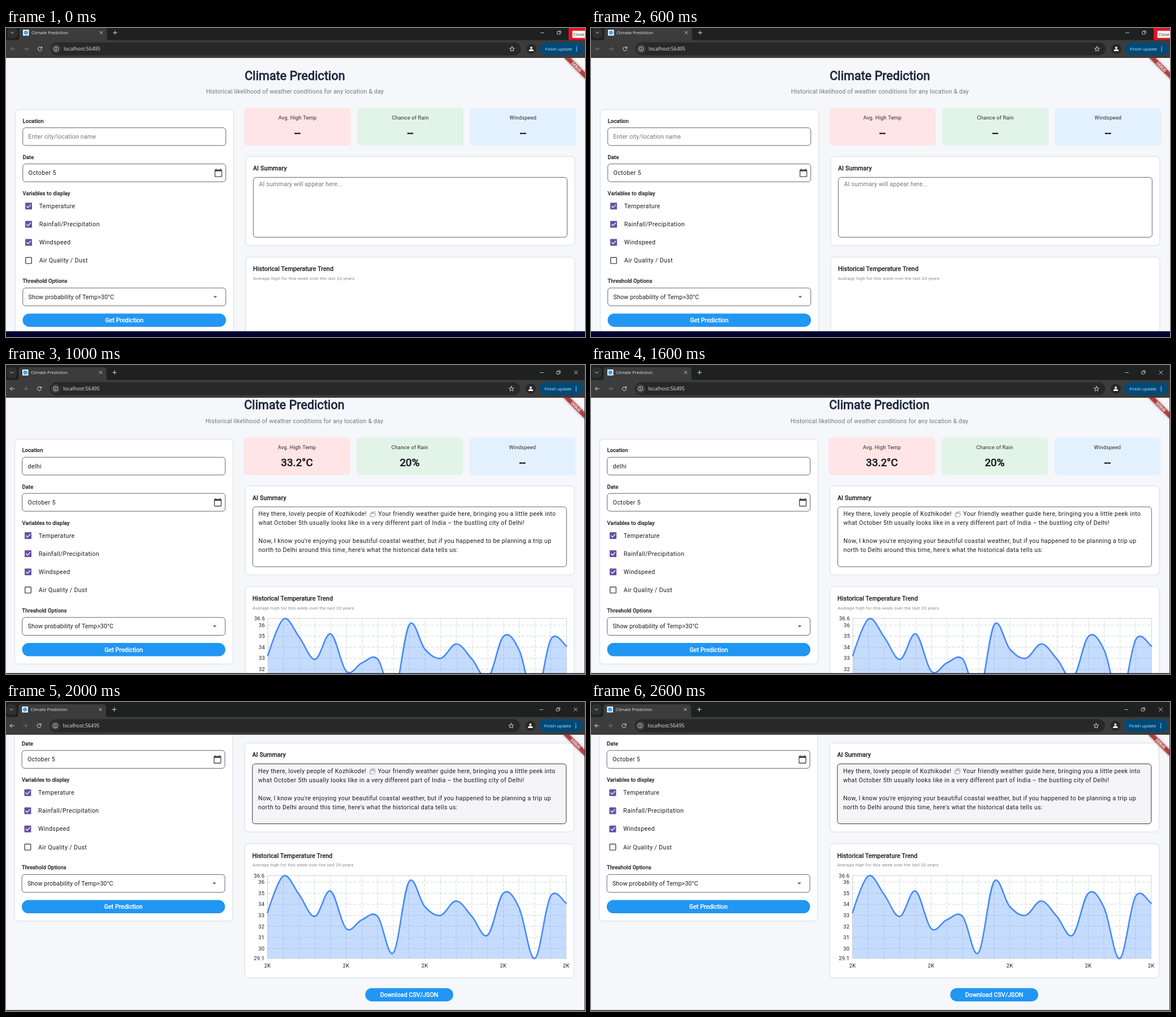
An HTML page for the animation above (3000 ms loop, 1024 px wide and 547 px high).

```html
<!DOCTYPE html>
<html lang="en">
<head>
<meta charset="utf-8">
<title>Climate Prediction</title>
<style>
  html, body { margin: 0; width: 100%; height: 100%; overflow: hidden; background: #f5f7fb; }
  svg { display: block; width: 1024px; height: 547px; }
  text { white-space: pre; font-family: Roboto, sans-serif; }
  .ui { font-family: "Open Sans", "Noto Sans", sans-serif; }
  .card { fill: #fff; filter: drop-shadow(0 .7px 1px rgba(0, 0, 0, .25)); }
  .line { fill: none; stroke-linecap: round; stroke-linejoin: round; }
</style>
</head>
<body>
<svg id="stage" viewBox="0 0 1024 547"></svg>
<script>
const INK = '#1d1b20', GREY = '#757575', BLUE = '#2196f3';
const SCALE = 2 / 3; // app units to stage pixels

const SCENES = [
  { dx: 0, chromeY: 0, scroll: 0, maximized: false, loaded: false, hover: false },
  { dx: -1, chromeY: 5, scroll: -13.3, maximized: true, loaded: true, hover: false },
  { dx: -1.6, chromeY: 5, scroll: -154.8, maximized: true, loaded: true, hover: true },
];

const SUMMARY = [
  [0, 'what October 5th usually looks like in a very different part of India – the bustling city of Delhi!'],
  [2, "Now, I know you're enjoying your beautiful coastal weather, but if you happened to be planning a trip up"],
  [3, "north to Delhi around this time, here's what the historical data tells us:"],
];

const TEMPS = [33.25, 36.55, 34.9, 32.9, 35.2, 31.8, 32.6, 32.9, 29.6, 36.05,
  33.8, 33, 34.3, 32.9, 31.2, 35, 33.7, 29.1, 34.7, 34.1];

const rect = (x, y, w, h, r, attrs) =>
  `<rect x="${x}" y="${y}" width="${w}" height="${h}" rx="${r}" ${attrs}/>`;
const circle = (x, y, r, attrs) => `<circle cx="${x}" cy="${y}" r="${r}" ${attrs}/>`;
const line = (d, color, width = 1, attrs = '') =>
  `<path class="line" d="${d}" stroke="${color}" stroke-width="${width}" ${attrs}/>`;
const group = (x, y, body) => `<g transform="translate(${x} ${y})">${body}</g>`;

// App text, vertically centred on y; bold is a thickened regular weight.
function text(x, y, str, { size = 16, gap = .25, color = INK, anchor = 'start', bold = false } = {}) {
  const px = size * SCALE;
  const stroke = bold ? `stroke="${color}" stroke-width="${px * .04}"` : '';
  return `<text x="${x}" y="${y + px * .355}" font-size="${px}" letter-spacing="${gap * SCALE}"
    fill="${color}" text-anchor="${anchor}" ${stroke}>${str.replace(/&/g, '&amp;').replace(/>/g, '&gt;')}</text>`;
}
const uiText = (x, y, str, px, color) =>
  `<text class="ui" x="${x}" y="${y + px * .36}" font-size="${px}" fill="${color}">${str}</text>`;

const label = (y, str) => text(29.5, y, str, { size: 14, bold: true });
const field = (x, y, w, h, fill = '#fff', stroke = '#55535a') =>
  rect(x, y, w, h, 5, `fill="${fill}" stroke="${stroke}" stroke-width=".9"`);
const button = (x, y, w, str) => rect(x, y, w, 23.5, 11.75, `fill="${BLUE}"`) +
  text(x + w / 2, y + 11.9, str, { gap: .1, color: '#fff', anchor: 'middle', bold: true });

function checkbox(y, str, checked) {
  const box = checked
    ? rect(34, y - 6, 12, 12, 1.2, 'fill="#6750a4"') + line(`M36.6 ${y + .2}l2.4 2.4 4.6-4.8`, '#fff', 1.3)
    : rect(34.7, y - 5.3, 10.6, 10.6, .8, 'fill="none" stroke="#49454f" stroke-width="1.4"');
  return box + text(58.7, y, str, { gap: .5 });
}

function form({ loaded }) {
  const calendar = 'M20 3h-1V1h-2v2H7V1H5v2H4c-1.1 0-2 .9-2 2v16c0 1.1.9 2 2 2h16c1.1 0 2-.9 2-2V5c0-1.1-.9-2-2-2zm0 18H4V8h16v13z';
  return rect(17, 145, 385, 397, 6, 'class="card"') +
    label(164.2, 'Location') + field(29.7, 176.6, 359, 31.4) +
    (loaded ? text(39.5, 192.3, 'delhi', { gap: .5 })
            : text(39.3, 192.3, 'Enter city/location name', { color: GREY })) +
    label(228.5, 'Date') + field(29.7, 240.6, 359, 31.6) + text(39.5, 256.3, 'October 5', { gap: .5 }) +
    `<path transform="translate(367.6 248.4) scale(${SCALE})" d="${calendar}" fill="#49454f"/>` +
    label(292.8, 'Variables to display') +
    ['Temperature', 'Rainfall/Precipitation', 'Windspeed', 'Air Quality / Dust']
      .map((name, i) => checkbox(315.3 + i * 32.1, name, i < 3)).join('') +
    label(447.9, 'Threshold Options') + field(29.7, 460.2, 359, 31.6) +
    text(39.5, 476, 'Show probability of Temp>30°C', { gap: .15 }) +
    '<path d="M366.7 474.4h6.7l-3.35 3.4z" fill="#616161"/>' +
    button(29.5, 505.4, 359.5, 'Get Prediction');
}

function stat(x, fill, name, value) {
  const style = { anchor: 'middle' };
  return rect(x, 141.7, 188.5, 66.5, 6, `fill="${fill}"`) +
    text(x + 94.2, 158.8, name, { ...style, size: 14, color: '#2b2a2e' }) +
    text(x + 94.2, 185.2, value, { ...style, size: 28, bold: true });
}

function summary({ loaded, hover }) {
  const top = 277, value = { gap: .5 };
  const wave = line('M3 10.5C1.4 8.6.6 7 1 6.4q.6-.7 1.5.4L1.8 4.2q.2-1 1.2-.4L4.6 6 3.8 2.4q.3-1 1.2-.2L6.7 5.6 6.5 2.5q.6-1 1.2 0L9 6.2q.4-1.6 1.2-1.3.8.4.2 2.2-.3 3.2-2.6 4-2.6.8-4.8-.6z', '#77757a', .7) +
    line('M7.8.6q2 .4 2.8 2.4M.4 9q.3 1.6 1.6 2.4', '#77757a', .6);
  return rect(424.5, 228, 581, 156.3, 6, 'class="card"') +
    text(437, 248.2, 'AI Summary', { bold: true }) +
    field(437.4, 264.4, 555, 106, hover ? '#f5f5f8' : '#fff', hover ? INK : undefined) +
    (loaded
      ? text(447.6, top, 'Hey there, lovely people of Kozhikode!', value) + group(644, 271, wave) +
        text(659.3, top, 'Your friendly weather guide here, bringing you a little peek into', value) +
        SUMMARY.map(([row, str]) => text(447.6, top + 16 * (row + 1), str, value)).join('')
      : text(447.5, 276.7, 'AI summary will appear here...', { color: GREY }));
}

function plot() {
  const left = 464.2, right = 992.3, top = 462, bottom = 608.8, max = 36.6, min = 29.1;
  const px = i => left + (right - left) * i / (TEMPS.length - 1);
  const py = v => bottom - (bottom - top) * (v - min) / (max - min);
  const pts = TEMPS.map((v, i) => [px(i), py(v)]);

  // Cubic segments whose tangents are a share of the neighbours' distance.
  let curve = `M${pts[0]}`, tangent = [0, 0];
  for (let i = 1; i < pts.length; i++) {
    const prev = pts[i - 1], next = pts[i + 1] || pts[i];
    const start = prev.map((p, k) => p + tangent[k]);
    tangent = prev.map((p, k) => (next[k] - p) / 2 * .35);
    curve += `C${start} ${pts[i].map((p, k) => p - tangent[k])} ${pts[i]}`;
  }

  const ticks = [36, 35, 34, 33, 32, 31, 30];
  const grid = ticks.map(v => `M${left} ${py(v)}H${right}`).join('') +
    TEMPS.slice(2).map((_, i) => `M${px(i + 1)} ${bottom}V${top}`).join('');
  return `<path d="${grid}" fill="none" stroke="#c3cbd0" stroke-width=".75" stroke-dasharray="5.33 2.67"/>` +
    `<path d="${curve}V${bottom}H${left}Z" fill="#448aff" fill-opacity=".3"/>` +
    rect(left, top, right - left, bottom - top, 0, 'fill="none" stroke="#bfc4c9" stroke-width=".8"') +
    line(curve, '#448aff', 2.6) +
    [max, ...ticks, min].map(v => text(458.8, py(v), String(v), { size: 14, anchor: 'end' })).join('') +
    [0, 5, 10, 15, 19].map(i => text(px(i), 621.4, '2K', { size: 14, anchor: 'middle' })).join('');
}

function page(scene) {
  const { loaded } = scene, centred = { anchor: 'middle' };
  return text(511, 84.2, 'Climate Prediction', { ...centred, size: 32, color: '#1b263b', bold: true }) +
    text(511, 112.5, 'Historical likelihood of weather conditions for any location & day', { ...centred, color: GREY }) +
    form(scene) +
    stat(421.3, '#ffe5e5', 'Avg. High Temp', loaded ? '33.2°C' : '--') +
    stat(620.8, '#e2f4e8', 'Chance of Rain', loaded ? '20%' : '--') +
    stat(820.2, '#e3f1ff', 'Windspeed', '--') +
    summary(scene) +
    rect(424.5, 406.3, 581, 236.3, 6, 'class="card"') +
    text(437, 426.7, 'Historical Temperature Trend', { bold: true }) +
    text(437, 443.2, 'Average high for this week over the last 20 years', { size: 12, color: '#8a8a8a' }) +
    (loaded ? plot() + button(637, 661.2, 155.5, 'Download CSV/JSON') : '');
}

const ribbon = `<g transform="translate(1025 53) rotate(45)">
  <rect x="-26.7" y="18.7" width="53.4" height="8" fill="#b71c1c" fill-opacity=".75"
    style="filter:drop-shadow(0 0 2px rgba(0,0,0,.5))"/>
  ${text(0, 22.7, 'DEBUG', { size: 10.2, gap: 0, color: '#fff', anchor: 'middle', bold: true })}</g>`;

function chrome({ maximized }) {
  const light = '#dedede', dim = '#7d7d7d';
  const arrow = (x, dir, color) => line(`M${x - 3.5} 37h7M${x + dir * .3} 33.7l${dir * 3.3} 3.3 ${-dir * 3.3} 3.3`, color);
  const cross = (x, y, r, color) => line(`M${x - r} ${y - r}l${2 * r} ${2 * r}m0 ${-2 * r}l${-2 * r} ${2 * r}`, color, .9);
  const star = Array.from({ length: 10 }, (_, i) => {
    const a = Math.PI * (i / 5 - .5), r = i % 2 ? 2 : 4.7;
    return [895 + r * Math.cos(a), 37.3 + r * Math.sin(a)];
  }).join('L');
  const close = maximized ? cross(1009, 8.2, 3, light)
    : rect(995, -6, 40, 27.3, 0, 'fill="#e81123"') +
      rect(1001.5, 4.8, 30, 13, 1, 'fill="#f9f9f9" stroke="#8a4a4a" stroke-width=".5"') +
      uiText(1003.3, 11.3, 'Close', 7.9, '#333');

  return rect(-5, -10, 1040, 32, 0, 'fill="#1f2020"') +
    rect(-5, 21.5, 1040, 31.5, 0, 'fill="#3c3c3c"') +
    rect(2.3, -1, 17.7, 19, 6, 'fill="#2f3030"') + line('M8.7 7.2l2.4 2.4 2.4-2.4', light) +
    '<path d="M19 22q4.5 0 4.5-5V4.500q0-5.500 5.500-5.500H173q5.500 0 5.500 5.500V17q0 5 4.500 5z" fill="#3c3c3c"/>' +
    rect(30, 3, 10.5, 10.5, .5, 'fill="#fff"') + circle(35.2, 8.2, 3.8, 'fill="#42a5f5"') +
    uiText(45, 8.2, 'Climate Prediction', 7.65, '#e6e6e6') +
    cross(168.5, 8.2, 2.3, light) + line('M189.700 8.200h6.600M193 4.900v6.600', light) +
    line('M945.500 8.500h6', light, .8) +
    line('M975.200 6.500h4.500v4.500h-4.500zM976.700 5h4.500v4.500', light, .8) + close +
    arrow(12, -1, maximized ? light : dim) + arrow(35.5, 1, dim) +
    line('M63 35.100a3.500 3.500 0 1 0 .4 2.800M63.500 33.200v2.600h-2.600', light) +
    rect(78.5, 25.600, 832, 22.800, 11.4, 'fill="#282828"') +
    circle(88.7, 37, 8.2, 'fill="#3c3c3c"') + circle(88.7, 37, 4, `fill="none" stroke="${light}" stroke-width=".9"`) +
    line('M88.700 36.700v2.200M88.700 35v.1', light) +
    uiText(102, 37, 'localhost:56495', 8.9, '#e6e6e6') +
    line(`M${star}Z`, light, .9) +
    circle(929, 37, 9, 'fill="#282828"') + circle(929, 34.9, 2, 'fill="#fff"') +
    '<path d="M924.800 41v-1q0-2.500 4.200-2.500t4.200 2.500v1z" fill="#fff"/>' +
    rect(944.300, 25.800, 77.500, 22.500, 11.2, 'fill="#004a77"') +
    uiText(953.3, 37, 'Finish update', 7.6, '#c9e8ff') +
    [33.6, 37, 40.4].map(y => circle(1009.3, y, .9, 'fill="#c9e8ff"')).join('');
}

function render(scene) {
  const { dx, chromeY, scroll, maximized } = scene;
  const edges = maximized
    ? rect(0, 545.5, 1024, 2, 0, 'fill="#211c26"') + rect(1023, 0, 1, 547, 0, 'fill="#3a3a3f"')
    : rect(0, 536.8, 1024, 11, 0, 'fill="#02022f"');
  return rect(0, 0, 1024, 547, 0, 'fill="#f5f7fb"') +
    group(dx, scroll, page(scene)) +
    group(dx, chromeY, ribbon + chrome(scene)) + edges;
}

const stage = document.getElementById('stage');
const pictures = SCENES.map(render);
let shown = -1;
function tick() {
  const index = Math.floor(performance.now() / 1000) % SCENES.length;
  if (index !== shown) stage.innerHTML = pictures[shown = index];
  requestAnimationFrame(tick);
}
tick();
</script>
</body>
</html>
```
